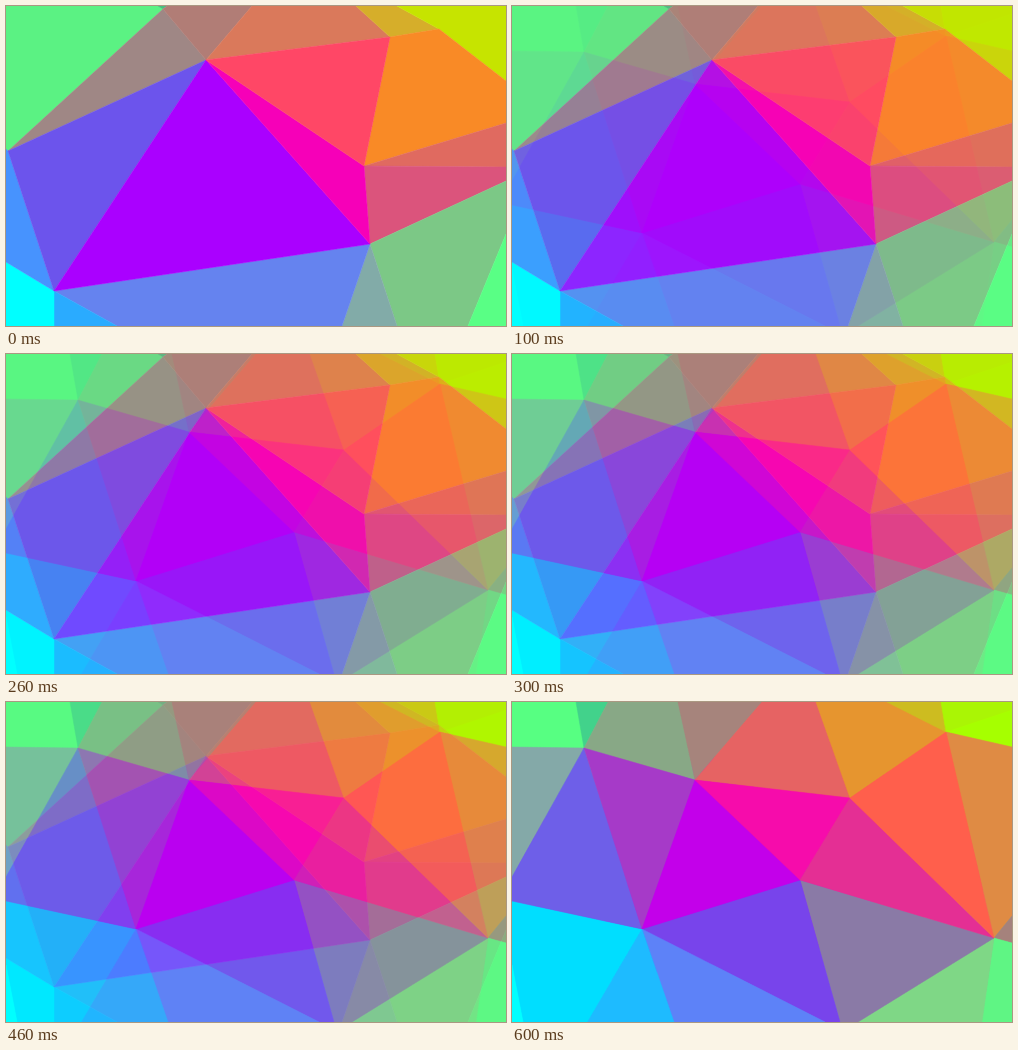
Write an HTML page that moves like this. It is 500 px wide and 320 px high and loops after 0.7 s.

```html
<!DOCTYPE html>
<html lang="en">
<head>
<meta charset="utf-8">
<title>Low-poly crossfade</title>
<style>
  html, body { margin: 0; width: 100%; height: 100%; overflow: hidden; }
  svg { display: block; width: 100vw; height: 100vh; }
  polygon { fill: var(--c); stroke: var(--c); stroke-width: .5; stroke-linejoin: round; }
  #over { animation: fade 700ms steps(7, jump-none) infinite; }
  @keyframes fade { from { opacity: 0; } to { opacity: 1; } }
</style>
</head>
<body>
<svg viewBox="0 0 500 320" preserveAspectRatio="none">
  <g id="base">
    <polygon style="--c:#5bf283" points="0,0 152,0 157,3 2,145 0,143"/>
    <polygon style="--c:#4bbd7f" points="152,0 161,0 157,3"/>
    <polygon style="--c:#9f8785" points="2,145 157,3 200,54"/>
    <polygon style="--c:#b17d76" points="157,3 161,0 246,0 200,54"/>
    <polygon style="--c:#da795b" points="200,54 246,0 350,0 384,31"/>
    <polygon style="--c:#d6ae2a" points="350,0 391,0 433,23 384,31"/>
    <polygon style="--c:#c6e400" points="391,0 500,0 500,75 433,23"/>
    <polygon style="--c:#f98a26" points="384,31 433,23 500,75 500,117 358,160"/>
    <polygon style="--c:#e06a60" points="358,160 500,117 500,161"/>
    <polygon style="--c:#db547c" points="358,160 500,161 500,175 364,238"/>
    <polygon style="--c:#7cc886" points="364,238 500,175 500,228 462,320 391,320"/>
    <polygon style="--c:#59ff85" points="500,228 500,320 462,320"/>
    <polygon style="--c:#82aba8" points="364,238 391,320 336,320"/>
    <polygon style="--c:#6583ef" points="48,285 364,238 336,320 111,320"/>
    <polygon style="--c:#2aabff" points="48,285 111,320 48,320"/>
    <polygon style="--c:#00ffff" points="0,256 48,285 48,320 0,320"/>
    <polygon style="--c:#4793fe" points="0,143 2,145 48,285 0,256"/>
    <polygon style="--c:#6c54ec" points="2,145 200,54 48,285"/>
    <polygon style="--c:#aa00ff" points="200,54 364,238 48,285"/>
    <polygon style="--c:#f600b8" points="200,54 358,160 364,238"/>
    <polygon style="--c:#ff4766" points="200,54 384,31 358,160"/>
  </g>
  <g id="over">
    <polygon style="--c:#57ff82" points="0,0 64,0 72,46 0,45"/>
    <polygon style="--c:#42d28b" points="64,0 96,0 72,46"/>
    <polygon style="--c:#88a886" points="96,0 166,0 183,78 72,46"/>
    <polygon style="--c:#a6847c" points="166,0 250,0 183,78"/>
    <polygon style="--c:#e66363" points="250,0 304,0 338,96 183,78"/>
    <polygon style="--c:#e6952f" points="304,0 375,0 434,30 338,96"/>
    <polygon style="--c:#cdbc20" points="375,0 429,0 434,30"/>
    <polygon style="--c:#aaf505" points="429,0 500,0 500,8 434,30"/>
    <polygon style="--c:#a6ff00" points="434,30 500,8 500,45"/>
    <polygon style="--c:#df8b44" points="434,30 500,45 500,214 482,236"/>
    <polygon style="--c:#a5827c" points="482,236 500,214 500,241"/>
    <polygon style="--c:#5ff584" points="482,236 500,241 500,320 470,320"/>
    <polygon style="--c:#7fd786" points="482,236 470,320 346,320"/>
    <polygon style="--c:#8a7aa6" points="288,178 482,236 346,320 328,320"/>
    <polygon style="--c:#7844eb" points="130,227 288,178 328,320 313,320"/>
    <polygon style="--c:#5d82f8" points="130,227 313,320 162,320"/>
    <polygon style="--c:#1ebbff" points="130,227 162,320 75,320"/>
    <polygon style="--c:#00deff" points="0,199 130,227 75,320 11,320 0,263"/>
    <polygon style="--c:#00ffff" points="0,263 11,320 0,320"/>
    <polygon style="--c:#84a9a8" points="0,45 72,46 0,175"/>
    <polygon style="--c:#6e5fe8" points="72,46 130,227 0,199 0,175"/>
    <polygon style="--c:#a63ac8" points="72,46 183,78 130,227"/>
    <polygon style="--c:#c300ea" points="183,78 288,178 130,227"/>
    <polygon style="--c:#f60cab" points="183,78 338,96 288,178"/>
    <polygon style="--c:#e42f94" points="338,96 482,236 288,178"/>
    <polygon style="--c:#ff5f4c" points="338,96 434,30 482,236"/>
  </g>
</svg>
</body>
</html>
```
